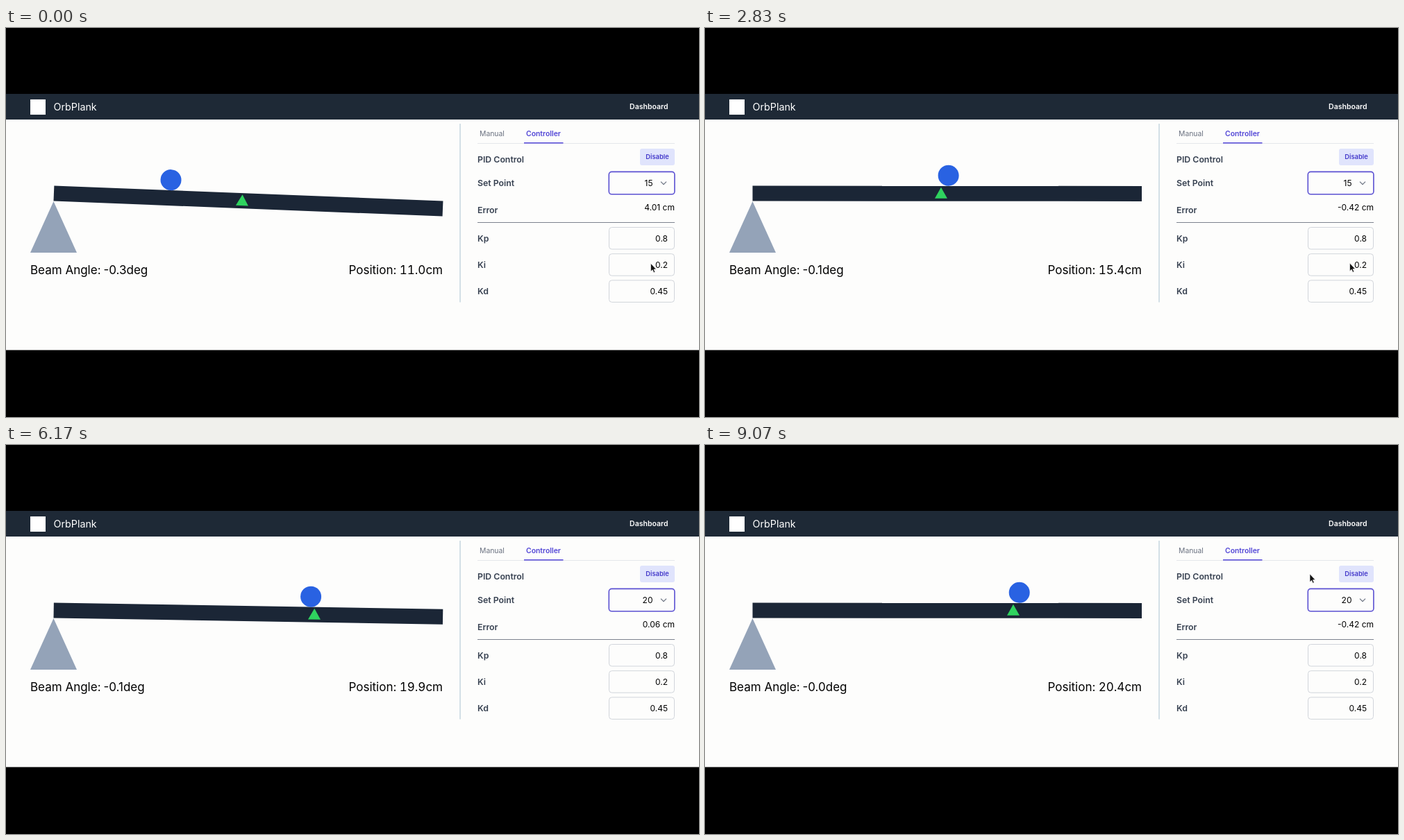
An HTML page for the animation above (9.13 s loop, 998 by 561 pixels).

```html
<!DOCTYPE html>
<html lang="en">
<head>
<meta charset="utf-8">
<title>Ball balancing controller</title>
<style>
  html, body { margin: 0; width: 100%; height: 100%; overflow: hidden; background: #000; }
  svg { display: block; width: 100vw; height: 100vh; font: 12px Inter, "Open Sans", sans-serif; }
  .end { text-anchor: end; }
  .label { font-size: 12.3px; font-weight: 600; fill: #374151; }
  .big { font-size: 17px; }
  .num { font-variant-numeric: tabular-nums; }
  .tab { font-size: 10.4px; }
  .box { fill: #fdfdfc; stroke: #d1d5db; }
</style>
</head>
<body>
<svg viewBox="0 0 998 561">
  <rect y="95" width="998" height="37" fill="#1e2936"/>
  <rect y="132" width="998" height="332.5" fill="#fdfdfc"/>
  <rect x="35" y="103" width="22" height="22" fill="#fff"/>
  <text x="68.5" y="119" font-size="14.3" fill="#fff">OrbPlank</text>
  <text x="953.5" y="117" class="end" font-size="10.5" font-weight="600" fill="#fff">Dashboard</text>

  <path d="M68.5 250L102 324H35Z" fill="#94a3b8"/>
  <g id="beam">
    <rect y="-22" width="560.5" height="22" fill="#1b2636"/>
    <path id="mark" d="M0-20L9-4H-9Z" fill="#2fd35f"/>
    <circle id="ball" cy="-37" r="15" fill="#2962e2"/>
  </g>
  <text x="35" y="355" class="big">Beam Angle:</text>
  <text x="140.5" y="355" class="big" id="angle"></text>
  <text x="493.5" y="355" class="big">Position:</text>
  <text x="629" y="355" class="big num end" id="pos"></text>

  <path d="M654 138V395.5" stroke="#a9c3d0"/>
  <path d="M679 166.5H963" stroke="#e5e7eb"/>
  <path d="M746 165.7H802.5" stroke="#5346d8" stroke-width="1.6"/>
  <text x="682" y="155.5" class="tab" fill="#6b7280">Manual</text>
  <text x="749" y="155.5" class="tab" font-weight="600" fill="#5145d6">Controller</text>
  <rect x="913" y="174" width="50" height="24" rx="3" fill="#e0e4fc"/>
  <text x="938" y="189.3" text-anchor="middle" font-size="9.3" font-weight="600" fill="#4338ca">Disable</text>
  <text x="679" y="193.5" class="label">PID Control</text>
  <text x="679" y="228.2" class="label">Set Point</text>
  <rect class="box" x="868.3" y="207.4" width="94.6" height="32.4" rx="4" style="stroke:#5b50d2;stroke-width:1.6"/>
  <text x="931.5" y="228.2" class="end" id="goal"></text>
  <path d="M943 221.7l4 4 4-4" fill="none" stroke="#6b7280" stroke-width="1.2"/>
  <text x="679" y="266.5" class="label">Error</text>
  <text x="963" y="262.9" class="end" id="error"></text>
  <path d="M679 280.5H963" stroke="#7c828e" stroke-width="1.2"/>
  <g id="gains"></g>
  <path id="cursor" d="M0 0V11.6L2.6 9.2L4.4 13.2L6.2 12.4L4.5 8.5H7.9Z" fill="#111" stroke="#fff" stroke-width=".6"/>
</svg>
<script>
const $ = id => document.getElementById(id);
const LOOP = 9130, FRAME = 100 / 3, LAST = 272;
const LAG = 150;                    // the drawn beam trails the readouts
const STEP_AT = 4440;               // set point goes from 15 to 20
const HIDE_AT = 4400, SHOW_AT = 8600;
const along = cm => (cm - 1.95) * 20.8;
const ease = u => (1 - Math.cos(Math.PI * u)) / 2;

// Swings from one turning point [ms, ...values] to the next along a half cosine.
const swing = points => t => {
  const i = points.findIndex(p => p[0] > t);
  if (i < 0) return points[points.length - 1].slice(1);
  const a = points[i - 1], b = points[i];
  const u = ease((t - a[0]) / (b[0] - a[0]));
  return a.slice(1).map((v, k) => v + (b[k + 1] - v) * u);
};
const posAt = swing([[-594, 8], [1181, 15.99], [2180, 15.99], [3400, 15.13], [4520, 15.13],
  [5517, 21.3], [6000, 19.65], [6780, 20.47], [7850, 20.47], [8010, 20.61], [9000, 20.42]]);
const angleAt = swing([[-210, -3.5], [518, 3], [1200, 0], [1924, 1.8], [2219, .3], [3500, -.44],
  [4480, -.44], [4650, -5], [5060, 4.68], [6087, -1.1], [6500, .6], [7627, -.2], [8090, .65], [9000, -.04]]);
const cursorAt = swing([[0, 928.5, 339.5], [3400, 928.5, 339], [4357, 893, 222], [SHOW_AT, 893, 222], [9000, 871, 186]]);

$('gains').innerHTML = [['Kp', .8], ['Ki', .2], ['Kd', .45]].map(([name, value], i) => {
  const y = 287.5 + i * 38.2;
  return `<rect class="box" x="868.5" y="${y}" width="94" height="31.5" rx="4"/>
    <text class="label" x="679" y="${y + 20}">${name}</text>
    <text class="end" x="953" y="${y + 20}">${value}</text>`;
}).join('');

function draw(now) {
  const frame = Math.min(Math.floor((now % LOOP + 5) / FRAME), LAST);
  const t = frame * FRAME;
  const goal = t < STEP_AT ? 15 : 20;
  $('beam').setAttribute('transform', `translate(68.5 249.5) rotate(${-angleAt(t)[0]})`);
  $('ball').setAttribute('cx', along(posAt(t)[0]));
  $('mark').setAttribute('transform', `translate(${along(goal)})`);

  // Readouts refresh every third frame.
  const tick = Math.max(0, Math.floor((frame + 1) / 3) * 3 - 1) * FRAME + LAG;
  const [pos] = posAt(tick), [angle] = angleAt(tick);
  $('angle').textContent = angle.toFixed(1) + 'deg';
  $('pos').textContent = pos.toFixed(1) + 'cm';
  $('error').textContent = (goal - pos).toFixed(2) + ' cm';
  $('goal').textContent = goal;

  $('cursor').setAttribute('transform', `translate(${cursorAt(t)})`);
  $('cursor').setAttribute('visibility', t > HIDE_AT && t < SHOW_AT ? 'hidden' : 'visible');
}
const start = performance.now();
(function loop() {
  draw(performance.now() - start);
  requestAnimationFrame(loop);
})();
</script>
</body>
</html>
```
